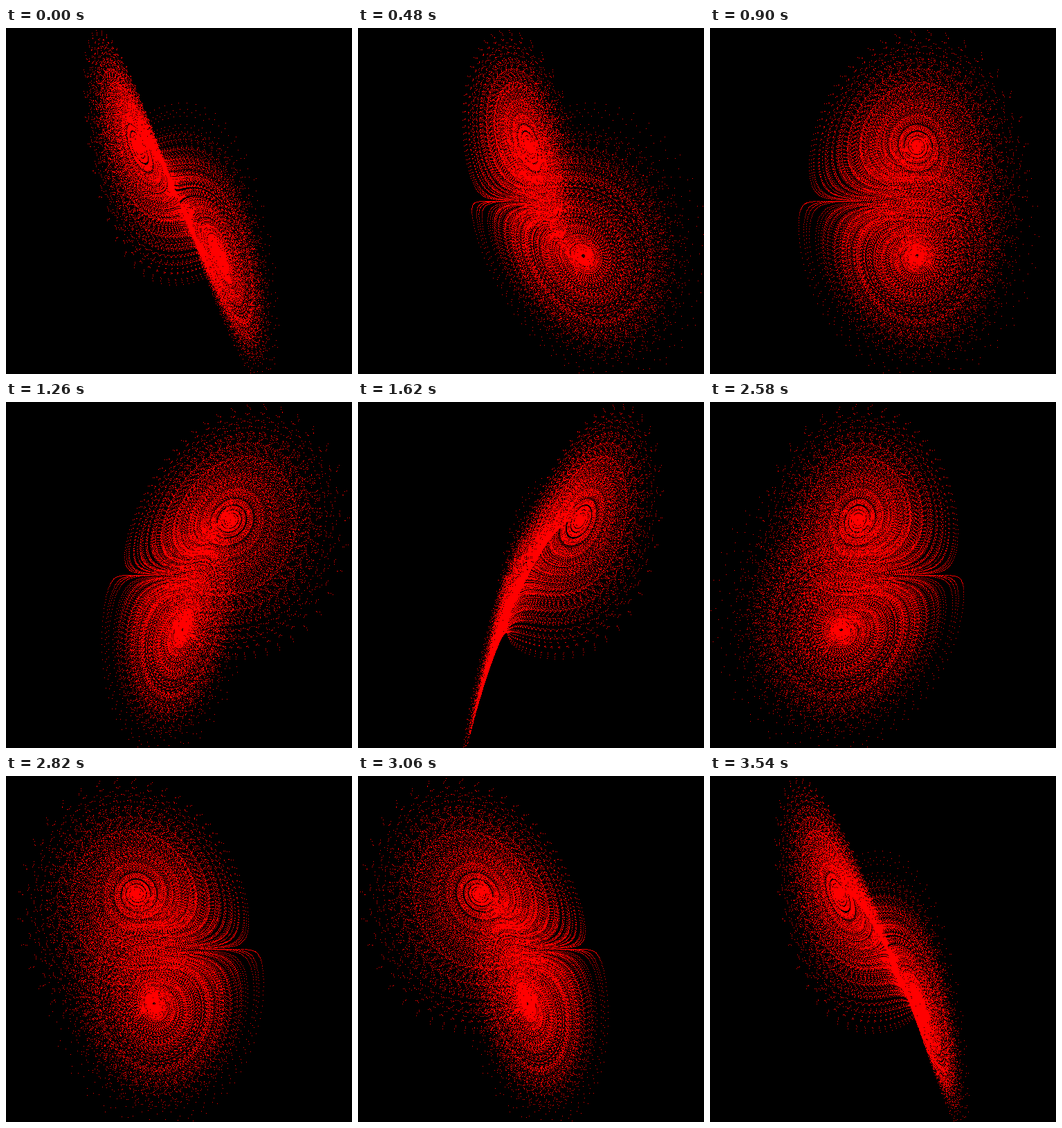
Write an HTML page with a canvas that moves like this. It is 500x500 px and loops after 3600 ms.

```html
<!DOCTYPE html>
<html lang="en">
<head>
<meta charset="utf-8">
<title>Rotating Lorenz attractor</title>
<style>
  html, body { margin: 0; width: 100%; height: 100%; overflow: hidden; background: #000; }
  canvas { display: block; width: 500px; height: 500px; }
</style>
</head>
<body>
<canvas id="stage" width="500" height="500"></canvas>
<script>
const SIZE = 500, CENTER = SIZE / 2;
const STEPS = 60, STEP_MS = 60;
const POINTS = 50000;
const SIGMA = 10, RHO = 28, BETA = 8 / 3, DT = 0.01;
const SCALE_H = 6.95, SCALE_V = 9.35, AXIS_Z = 19.9;
const BLACK = 0xff000000, RED = 0xff0000ff; // little-endian ABGR

const ctx = document.getElementById('stage').getContext('2d');
const image = ctx.createImageData(SIZE, SIZE);
const pixels = new Uint32Array(image.data.buffer);

// Plain Euler integration; the coarse step gives the dotted spirals.
// The start close to the z axis makes the first loop the widest.
function traceAttractor() {
  const points = [];
  let x = 0.002, y = 0.002, z = 20;
  for (let i = 0; i < POINTS; i++) {
    const dx = SIGMA * (y - x);
    const dy = x * (RHO - z) - y;
    const dz = x * y - BETA * z;
    x += dx * DT;
    y += dy * DT;
    z += dz * DT;
    points.push({
      x: x * SCALE_H,
      depth: (z - AXIS_Z) * SCALE_H,
      row: Math.floor(CENTER + y * SCALE_V)
    });
  }
  return points.filter(p => p.row >= 0 && p.row < SIZE);
}

const points = traceAttractor();

function draw(step) {
  const angle = step / STEPS * 2 * Math.PI;
  const cos = Math.cos(angle), sin = Math.sin(angle);
  pixels.fill(BLACK);
  for (const p of points) {
    const col = Math.floor(CENTER + p.x * cos + p.depth * sin);
    if (col >= 0 && col < SIZE) pixels[p.row * SIZE + col] = RED;
  }
  ctx.putImageData(image, 0, 0);
}

const start = performance.now();
let shown = -1;

function tick() {
  const step = Math.floor((performance.now() - start) / STEP_MS) % STEPS;
  if (step !== shown) draw(shown = step);
  requestAnimationFrame(tick);
}
tick();
</script>
</body>
</html>
```
